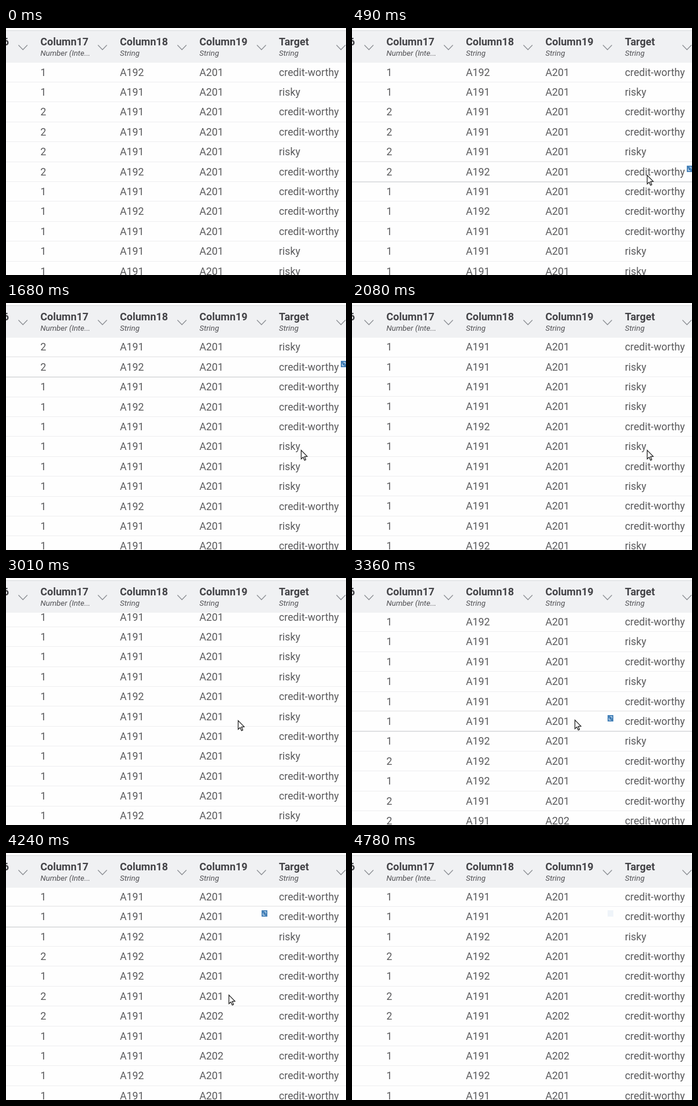
These frames come from a looping animation (588 by 427 pixels, 5.65 s). An HTML page with a canvas:

```html
<!DOCTYPE html>
<html>
<head>
<meta charset="utf-8">
<style>
html, body { margin: 0; width: 588px; height: 427px; overflow: hidden; background: #fefefe; }
canvas { display: block; }
</style>
</head>
<body>
<canvas id="stage" width="588" height="427"></canvas>
<script>
const ctx = document.getElementById('stage').getContext('2d');
const LOOP = 5650, TICK = 70, PITCH = 34.4, COL = 137.5, LEFT = 59.5, NOTCH = 4 * PITCH + .2;

// Cells that differ from the usual 1, A191, A201, credit-worthy
const twos = [3, 4, 5, 6, 20, 22, 23];
const phone = [1, 6, 8, 13, 19, 20, 21, 26];
const foreign = [23, 25];
const risky = [2, 5, 10, 11, 12, 14, 16, 19];
const rows = Array.from({ length: 27 }, (_, i) => {
  const pick = (list, rare, usual) => list.includes(i + 1) ? rare : usual;
  return [
    pick(twos, '2', '1'), pick(phone, 'A192', 'A191'),
    pick(foreign, 'A202', 'A201'), pick(risky, 'risky', 'credit-worthy')
  ];
});
const types = ['', 'Number (Inte...', 'String', 'String', 'String'];

const ramp = (t, from, to) => Math.min(1, Math.max(0, (t - from) / (to - from)));
const mix = (a, b, p) => a + (b - a) * p;
const sine = p => .5 - .5 * Math.cos(Math.PI * p);
const outBack = p => 1 + 2.7 * (p - 1) ** 3 + 1.7 * (p - 1) ** 2;

// Each wheel turn nudges the table, which then lands one notch further
const turns = [
  { from: 1220, to: 1680, nudge: 2.2 },
  { from: 2080, to: 2080, nudge: 0 },
  { from: 2540, to: 3080, nudge: 8.6 },
  { from: 3760, to: 4240, nudge: 2.2 }
];
const scrollAt = t => turns.reduce(
  (sum, { from, to, nudge }) => sum + (t >= to ? NOTCH : t >= from ? nudge : 0), 0);

function pointerAt(t) {
  const tick = Math.floor(t / TICK) * TICK;
  const enter = outBack(ramp(tick, 0, 490));
  const slide = sine(ramp(tick, 2540, 3150));
  const leave = ramp(tick, 4480, 4690);
  return [
    mix(600, 511, enter) - 125 * slide,
    mix(430, 255, enter) - 9 * slide + 334 * leave
  ];
}

const hovers = [
  { row: 5, col: 3, alpha: t => ramp(t, 280, 490) },
  { row: 17, col: 2, alpha: t => ramp(t, 3080, 3360) - .92 * ramp(t, 4500, 4780) }
];

function text(str, x, y, font, color) {
  ctx.font = font + ' Roboto, sans-serif';
  ctx.fillStyle = color;
  ctx.fillText(str, x, y);
}

function rect(x, y, w, h, color) {
  ctx.fillStyle = color;
  ctx.fillRect(x, y, w, h);
}

function line(points, color, width) {
  ctx.beginPath();
  points.forEach(p => ctx.lineTo(...p));
  ctx.strokeStyle = color;
  ctx.lineWidth = width;
  ctx.stroke();
}

const ruleY = y => Math.round(92.9 + y);

function drawHeader() {
  rect(0, 0, 588, 4, '#fefefe');
  rect(0, 4, 588, 56, '#f0f1f3');
  rect(0, 4, 588, 1, '#d6d8db');
  types.forEach((type, i) => {
    const x = LEFT + (i - 1) * COL;
    text(i < 4 ? 'Column' + (16 + i) : 'Target', x, 30, 'bold 18px', '#434347');
    text(type, x, 47.5, 'italic 13.4px', '#505054');
    line([[x + 99.5, 29.5], [x + 107.3, 37.5], [x + 115, 29.5]], '#8b8e93', 1.3);
  });
}

function drawRows(scroll) {
  rows.forEach((cells, i) => {
    const y = i * PITCH - scroll;
    cells.forEach((c, j) => text(c, LEFT + j * COL, Math.round(82.5 + y), '17.8px', '#5a5a5c'));
    rect(0, ruleY(y), 588, 1, '#eeeef0');
  });
}

function drawHover({ row, col, alpha }, scroll, t) {
  const y = row * PITCH - scroll;
  const x = Math.round(LEFT + col * COL + 107), top = Math.round(65.6 + y);
  ctx.save();
  ctx.globalAlpha = alpha(t);
  rect(0, ruleY(y - PITCH) - 1, 588, 2, '#eeeeef');
  rect(0, ruleY(y), 588, 2, '#dfe0e2');
  rect(x, top, 10, 11, '#4581b8');
  line([[x + 2.5, top + 5], [x + 2.5, top + 8.5], [x + 6, top + 8.5]], '#d9e7f3', 1);
  line([[x + 4.5, top + 2.5], [x + 7.5, top + 2.5], [x + 7.5, top + 5.5]], '#d9e7f3', 1);
  ctx.restore();
}

function drawPointer([x, y]) {
  ctx.save();
  ctx.translate(Math.round(x) - .5, Math.round(y) - .5);
  ctx.beginPath();
  [[0, 0], [0, 15], [3.4, 12], [5.8, 17.3], [8, 16.3], [5.8, 11], [10.4, 10.6]]
    .forEach(p => ctx.lineTo(...p));
  ctx.closePath();
  ctx.fillStyle = '#fff';
  ctx.fill();
  ctx.strokeStyle = '#222';
  ctx.stroke();
  ctx.restore();
}

const start = performance.now();
function draw() {
  const t = (performance.now() - start) % LOOP;
  const scroll = scrollAt(t);
  rect(0, 0, 588, 427, '#fefefe');
  drawRows(scroll);
  hovers.forEach(h => drawHover(h, scroll, t));
  drawHeader();
  drawPointer(pointerAt(t));
  requestAnimationFrame(draw);
}
draw();
</script>
</body>
</html>
```
